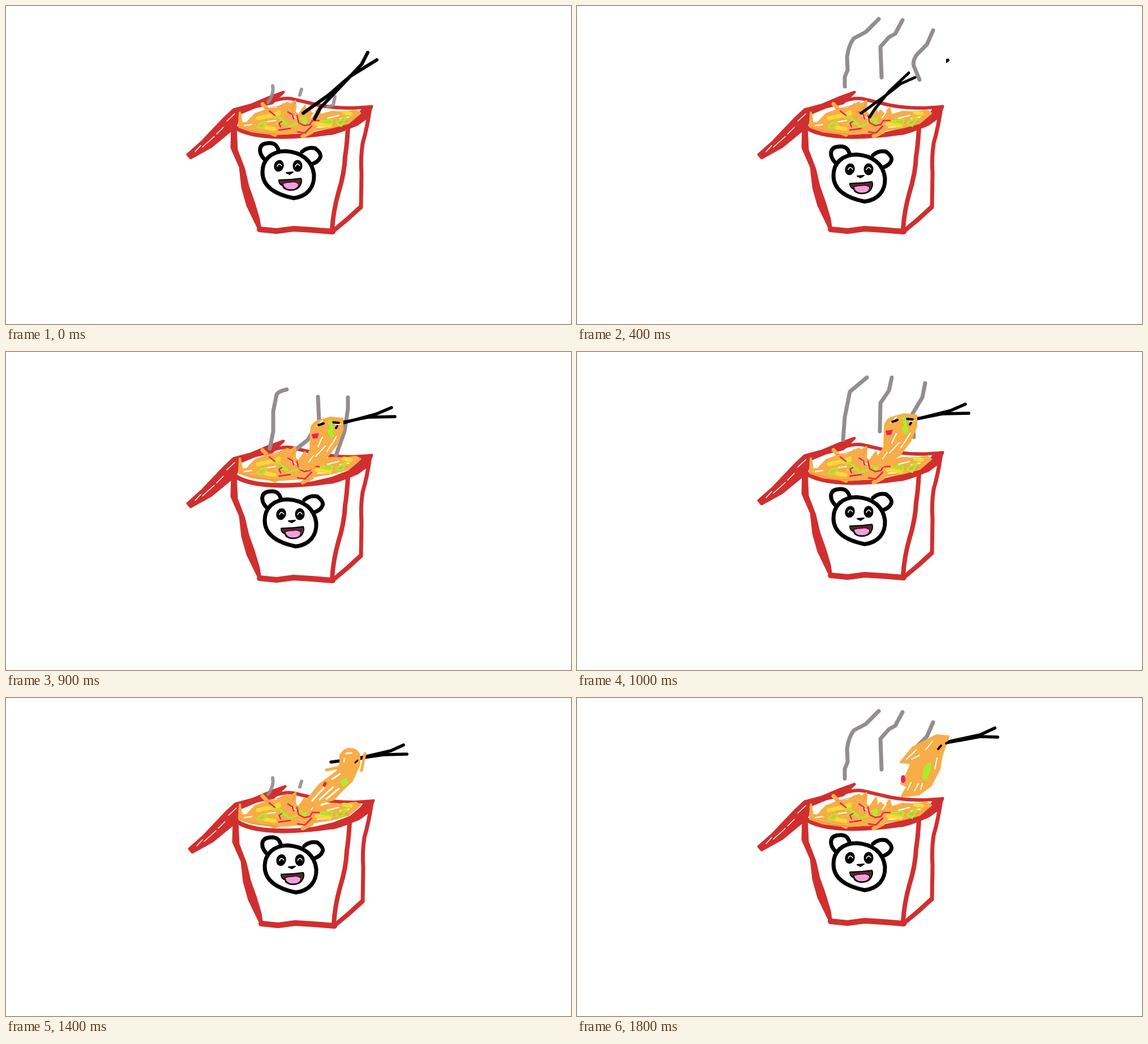
Animation, 998 px wide and 561 px high, one loop 1900 ms. Source, as an HTML page without scripts:

```html
<!DOCTYPE html>
<html lang="en">
<head>
<meta charset="utf-8">
<title>Noodle box</title>
<style>
html, body { margin: 0; width: 100%; height: 100%; overflow: hidden; background: #fff; }
svg { display: block; width: 100vw; height: 100vh; }
path, ellipse { fill: none; stroke-linecap: round; stroke-linejoin: round; }

.red path { stroke: #d12f2f; stroke-width: 8; }
.red .fill { fill: #d12f2f; stroke-width: 5; }
.red .gap { stroke: #fff; stroke-width: 1.5; }
.black path { stroke: #000; stroke-width: 7; }
.black .eye { fill: #000; stroke: none; }
.orange { stroke: #f8ad48; stroke-width: 7; }
.mass { fill: #f8ad48; stroke: #f8ad48; stroke-width: 4; }
.gap { stroke: #fff; stroke-width: 2; }
.shade { stroke: #e58a3c; stroke-width: 1; }
.yellow { stroke: #ffd935; stroke-width: 7; }
.green { stroke: #a6f02b; stroke-width: 3; }
.leaf { fill: #a6f02b; }
.pink { stroke: #ee1f62; stroke-width: 2.5; }
.chunk { fill: #ee1f62; }
.tip { stroke: #000; stroke-width: 4; }

.box, .panda, .dot, .sticks { animation: 1900ms step-end infinite; }
.box { animation-name: box; }
.panda { animation-name: panda; }
.dot { animation-name: dot; }
.sticks path { stroke: #000; stroke-width: 6; animation: 1900ms infinite; }
.sticks .a { animation-name: stick-a; }
.sticks .b { animation-name: stick-b; }

/* --i is the 100 ms step in which a pose first appears */
.steam path, .lump {
  visibility: hidden;
  animation: thrice 1900ms step-end calc((var(--i) - 19) * 100ms) infinite;
}
.steam path { stroke: #948d90; stroke-width: 7; }
.steam .late { animation-name: twice; }
.lump { animation-name: lift; }

@keyframes thrice {
  0%, 36.842%, 73.684% { visibility: visible; }
  5.263%, 42.105%, 78.947%, 100% { visibility: hidden; }
}
@keyframes twice {
  0%, 36.842% { visibility: visible; }
  5.263%, 42.105%, 100% { visibility: hidden; }
}
@keyframes lift {
  0% { visibility: visible; transform: translate(var(--p)); }
  5.263% { visibility: visible; transform: translate(var(--q)); }
  10.526% { visibility: var(--last, visible); transform: translate(var(--r, 0, 0)); }
  15.789%, 100% { visibility: hidden; }
}
@keyframes box {
  0%, 10.526%, 21.052%, 31.578%, 42.105%, 52.631%, 78.947%, 89.473% { transform: none; }
  5.263%, 15.789%, 26.315%, 47.368%, 57.894% { transform: translate(0, 5px); }
  36.842% { transform: translate(0, -5px); }
  63.157%, 94.736%, 100% { transform: none; }
  73.684%, 84.21% { transform: translate(3px, 4px); }
}
@keyframes panda {
  0%, 10.526%, 31.578%, 52.631%, 63.157%, 78.947%, 94.736%, 100% { transform: none; }
  5.263%, 36.842% { transform: translate(3px, 3px); }
  21.052% { transform: translate(0, 6px); }
  26.315%, 47.368%, 57.894%, 73.684%, 84.21% { transform: translate(4px, 4px); }
}
@keyframes dot {
  0%, 47.368%, 100% { visibility: hidden; }
  5.263% { visibility: visible; }
}
@keyframes stick-a {
  0% { d: path("M525 189L570 157L608 124L655 95"); animation-timing-function: steps(4); }
  21.052% { d: path("M502 189L545 158L572 137L597 126"); stroke-width: 5; animation-timing-function: steps(3); }
  36.842% { d: path("M526 156L577 137L605 121L651 109"); animation-timing-function: steps(2); }
  47.368% { d: path("M577 125L600 123L640 115L687 114"); animation-timing-function: steps(3); }
  63.157% { d: path("M605 106L625 103L660 97L702 96"); animation-timing-function: steps(2); }
  73.684% { d: path("M612 110L632 105L667 100L708 99"); animation-timing-function: steps(4); }
  94.736%, 100% { d: path("M645 80L680 74L712 68L743 69"); animation-timing-function: step-end; }
}
@keyframes stick-b {
  0% { d: path("M545 199L555 180L628 103L639 82"); animation-timing-function: steps(4); }
  21.052% { d: path("M517 196L526 182L551 151L586 118"); stroke-width: 5; animation-timing-function: steps(3); }
  36.842% { d: path("M560 142L590 127L617 112L641 95"); animation-timing-function: steps(2); }
  47.368% { d: path("M577 128L600 124L655 109L681 98"); animation-timing-function: steps(3); }
  63.157% { d: path("M568 109L612 104L672 91L696 80"); animation-timing-function: steps(2); }
  73.684% { d: path("M574 113L620 107L680 93L702 83"); animation-timing-function: steps(4); }
  94.736%, 100% { d: path("M638 90L652 78L712 65L738 53"); animation-timing-function: step-end; }
}
</style>
</head>
<body>
<svg viewBox="0 0 998 561" preserveAspectRatio="none">
  <g class="box red">
    <path class="fill" d="M490 152L465 161L432 175L402 183L387 197L365 220L347 239L321 262L326 268L362 248L396 220L407 208L411 190L440 178L470 171Z"/>
    <path class="gap" d="M334 257L344 246M347 249L368 230M372 226L384 214M390 203L404 190M414 187L434 179"/>
    <path style="stroke-width:6" d="M409 188L440 177L470 168Q495 160 510 165L540 172Q570 180 612 180L645 178"/>
    <path class="fill" d="M400 208L399 250L414 284L418 320L427 352L444 387L449 396L446 376L437 346L427 318L420 288L407 254L405 212Z"/>
    <path d="M401 211C425 231 480 233 535 228S590 219 606 211"/>
    <path class="fill" d="M540 226L575 218L606 206L625 190L632 180L646 177L638 196L620 209L600 217L575 225Z"/>
    <path style="stroke-width:10" d="M448 394L478 397L508 393L540 395L577 398"/>
    <path d="M604 215Q602 248 599 265Q598 295 587 330Q578 362 576 394"/>
    <path style="stroke-width:7" d="M643 180Q638 215 630 242Q626 268 628 295L627 355"/>
    <path d="M626 355Q604 376 579 396"/>
  </g>

  <g class="panda black">
    <path d="M456 270C445 258 446 243 462 242C476 240 480 248 482 257M523 257Q533 248 546 251Q558 260 555 267Q552 275 540 279"/>
    <path d="M494 256C468 256 453 272 453 293C453 318 474 332 508 339C532 336 545 320 544 298C541 272 522 258 494 256Z"/>
    <ellipse class="eye" cx="482" cy="282" rx="8.5" ry="10.5" transform="rotate(18 482 282)"/>
    <ellipse class="eye" cx="515" cy="282" rx="8.5" ry="10.5"/>
    <path style="fill:#000;stroke-width:2" d="M495 294L507 293L501 297Z"/>
    <path style="stroke:#fff;stroke-width:1.5" d="M479 283Q482 275 487 282M511 283Q515 275 519 282"/>
    <path style="fill:#5b2328;stroke-width:2" d="M482 307Q502 307 521 304Q524 309 519 318Q514 325 503 325Q490 324 489 317Q482 315 482 307Z"/>
    <path style="fill:#f39ddb;stroke-width:1" d="M489 313Q497 311 503 311Q513 309 517 315Q515 324 503 324Q491 324 489 313Z"/>
  </g>

  <g class="steam">
    <path style="--i:0;stroke-width:6;stroke-opacity:.9" d="M471 141Q474 154 463 170M522 147L519 157M581 160L578 175L568 178"/>
    <path style="--i:1" d="M466 170L472 140L475 110M515 172L535 150L548 118M583 180L596 145L600 118"/>
    <path style="--i:2" d="M466 170L472 140L472 105L478 75Q480 70 496 66M508 175L533 155L553 122L551 79M583 182L598 140L604 100L604 80"/>
    <path style="--i:3" d="M470 155L473 115L482 70L512 45M535 140L536 90L551 68L556 45M595 150L592 110L610 80L615 55"/>
    <path style="--i:4" d="M473 142L473 125L478 113L477 90Q480 68 489 57L510 46L533 23M538 126L536 72L551 55L562 49L575 25M605 130L595 106Q592 97 601 85L618 68L629 43"/>
    <path class="late" style="--i:5" d="M480 88L479 80L509 34M537 90L541 66L549 58L562 51L570 27M600 97L621 73L621 50L614 42"/>
    <path class="late" style="--i:6" d="M493 60L515 30M556 55L570 27M620 60L614 40"/>
  </g>

  <g class="food">
    <path class="mass" d="M413 188L412 213L435 221L475 226L520 223L575 214L605 206L625 189L618 185L596 188L575 187L555 193L552 181L543 192L536 185L530 194L528 177L517 193L510 188L511 168L503 174L497 171L478 181L462 183L440 191L425 207L416 207Z"/>
    <path class="orange" d="M453 173L460 180M466 223L475 227M524 230L540 222M490 175L509 178"/>
    <path class="gap" d="M421 211L434 209M462 204L476 202M504 193L513 198M539 197L546 187M568 198L588 193M550 214L574 212M590 199L606 196"/>
    <path class="shade" d="M413 213Q450 226 480 226M457 182L488 175M505 183L511 169M555 210L604 203"/>
    <path class="yellow" d="M445 198L482 190M458 214L474 217M597 188L609 190M471 193L482 188M549 208L572 211"/>
    <path class="green" d="M444 214Q448 204 460 205Q456 219 444 214M474 198L483 196L492 205L477 208M498 213L515 207M520 201L529 197L530 208L524 206M556 203L575 200L577 208L561 206M583 206L602 194L592 212Z"/>
    <path class="green" style="stroke-width:5" d="M487 202L496 208M523 199L528 205"/>
    <path class="pink" d="M465 185L475 193M498 187L506 192L508 199M487 204L482 207L485 213M482 219L502 216M514 193L517 206L527 211L537 209L541 202L553 202M515 222L528 224L540 212"/>
  </g>

  <path class="dot" style="fill:#000" d="M652 93L657 93L658 97L652 101Z"/>
  <g class="sticks">
    <path class="a" d="M525 189L570 157L608 124L655 95"/>
    <path class="b" d="M545 199L555 180L628 103L639 82"/>
  </g>

  <g class="lump" style="--i:6;--p:-8px,14px;--q:0,0;--last:hidden">
    <path class="mass" d="M548 147L562 147L562 178L555 192L535 198L532 184L543 166Z"/>
    <path class="orange" style="stroke-width:5" d="M544 135L552 145L553 138M568 138L557 148M533 154L523 163L522 177L531 187"/>
    <path class="gap" d="M538 181L548 168M541 190L550 183"/>
    <path class="chunk" d="M535 153L545 148L544 163L535 165Z"/>
    <ellipse class="green" style="stroke-width:5" cx="555" cy="164" rx="6" ry="14"/>
  </g>

  <g class="lump" style="--i:8;--p:-12px,4px;--q:0,0;--r:5px,-6px">
    <path class="mass" d="M539 140Q540 124 555 121L573 116L594 118L594 137L584 162L565 187L535 207L518 205L538 174Z"/>
    <path class="gap" d="M551 167L559 150M547 184L564 166M567 175L584 149M535 194L543 183M549 131L559 121M582 128L591 127"/>
    <path class="tip" d="M552 129L561 126M577 124L588 125M583 134L585 131"/>
    <path class="leaf" d="M568 122L576 120L580 150L574 151L567 140L573 135Z"/>
    <path class="chunk" d="M540 145L553 143L550 152L542 153Z"/>
  </g>

  <g class="lump" style="--i:11;--p:-5px,6px;--q:0,0;--r:4px,-2px">
    <path class="mass" d="M580 121L580 107Q586 96 597 97Q609 98 610 110L610 122L603 138L588 161L570 188L545 195L514 192L535 158L560 143Z"/>
    <path class="orange" style="stroke-width:5" d="M554 131L578 126M621 110L612 137"/>
    <path class="gap" d="M529 182L549 162M538 188L561 160M549 181L574 158M558 187L584 165M588 112L602 116M574 150L568 156"/>
    <path class="tip" style="stroke-width:2" d="M586 108L592 104M588 116L590 113M603 111L602 112"/>
    <path class="chunk" d="M554 136L563 128L568 132L559 141Z"/>
    <path class="leaf" d="M589 146L600 142L604 148L599 156L590 155Z"/>
  </g>

  <g class="lump" style="--i:14;--p:0,0;--q:9px,-7.5px;--r:18px,-15px">
    <path class="mass" d="M591 115L591 101Q598 89 608 90Q622 91 624 103L624 117L611 146L594 162L578 179L550 186L525 201L532 180L555 152L585 130Z"/>
    <path class="orange" style="stroke-width:5" d="M566 127L590 122M634 98L628 128"/>
    <path class="gap" style="stroke-width:3" d="M541 181L562 158M554 179L578 157M566 178L588 160M576 143L590 134M601 98L610 97M598 107L597 112"/>
    <path class="tip" style="stroke-width:3" d="M617 114L621 110"/>
    <path class="chunk" d="M559 154L563 147L567 150L563 158Z"/>
    <path class="leaf" d="M592 145L601 141L605 149L599 157L592 153Z"/>
  </g>

  <g class="lump" style="--i:17;--p:-9px,7.5px;--q:0,0;--last:hidden">
    <path class="mass" d="M656 68L635 66L612 78L594 87L572 113L591 115L584 132L573 151L584 156L574 173L604 170L625 154L640 125L644 101Z"/>
    <path class="gap" d="M582 108L600 91M591 108L605 101M590 149L584 162M603 151L596 164M610 151L607 161M628 76L616 91M636 106L632 125"/>
    <path class="tip" d="M638 90L643 84M652 80L656 78"/>
    <ellipse class="leaf" cx="618" cy="129" rx="6" ry="16" transform="rotate(18 618 129)"/>
    <ellipse class="chunk" cx="576" cy="143" rx="4" ry="7"/>
  </g>
</svg>
</body>
</html>
```
